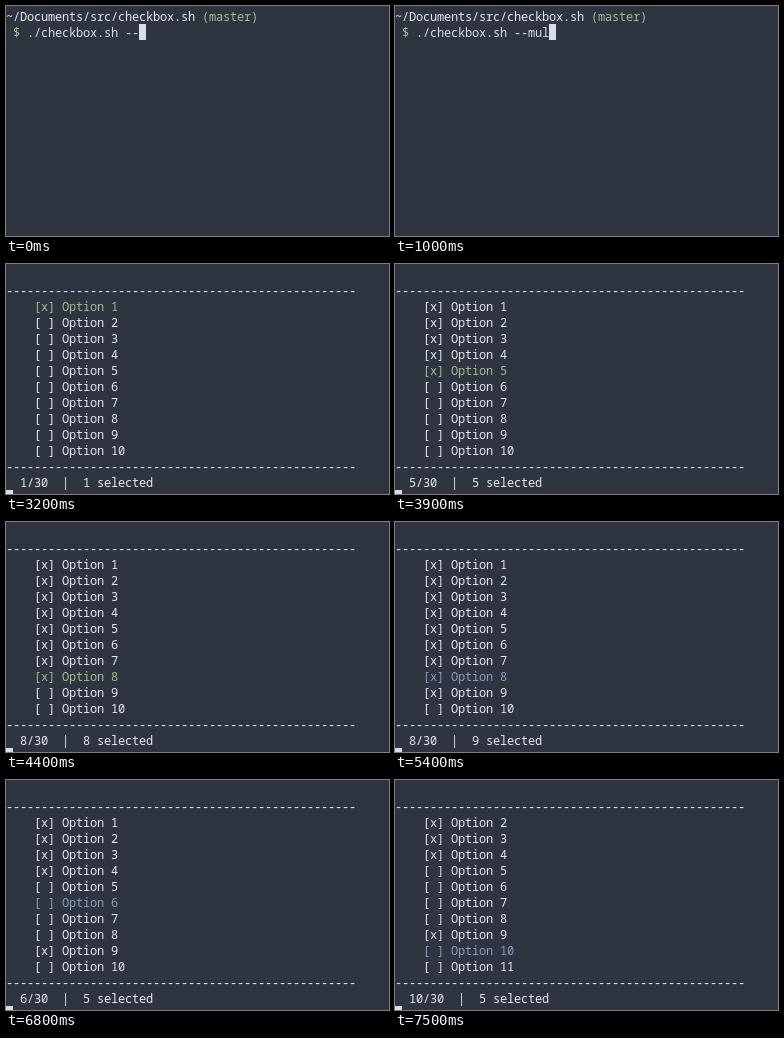
An HTML page that plays this animation: 383 px wide and 230 px high, repeating every 8000 ms.

```html
<!DOCTYPE html>
<html lang="en">
<head>
<meta charset="utf-8">
<title>checkbox.sh</title>
<style>
  html, body { margin: 0; width: 100%; height: 100%; overflow: hidden; background: #2e3440; }
  svg { display: block; }
  text { font: 12px "Noto Sans Mono", "DejaVu Sans Mono", monospace; white-space: pre; }
</style>
</head>
<body>
<svg id="screen" width="383" height="230" viewBox="0 0 383 230"></svg>
<script>
const LOOP = 8000, CELL_W = 7, CELL_H = 16, TOP = 2, ASCENT = 13;
const PAGE = 10, TOTAL = 30, MENU_AT = 2400;
const WHITE = '#e5e9f0', FG = '#d8dee9', GREEN = '#a3be8c', BLUE = '#81a1c1', RED = '#bf616a';
const MODE_COLOR = { move: BLUE, select: GREEN, unselect: RED };

const WORD = 'multiple';
const KEY_TIMES = [500, 700, 1000, 1200, 1400, 1500, 1800, 1900];

// [time, active option, mode]
const MOVES = [
  [2400, 1, 'move'],
  [3200, 1, 'select'], [3500, 2, 'select'], [3700, 3, 'select'], [3900, 5, 'select'],
  [4100, 6, 'select'], [4300, 7, 'select'], [4400, 8, 'select'], [4800, 9, 'select'],
  [5200, 9, 'move'], [5400, 8, 'move'],
  [5900, 8, 'unselect'], [6100, 7, 'unselect'], [6200, 6, 'unselect'], [6400, 5, 'unselect'],
  [6600, 5, 'move'], [6800, 6, 'move'], [7000, 7, 'move'], [7200, 8, 'move'],
  [7400, 9, 'move'], [7500, 10, 'move']
];

const screen = document.getElementById('screen');

function add(tag, attrs, content = '') {
  const node = document.createElementNS('http://www.w3.org/2000/svg', tag);
  for (const name in attrs) node.setAttribute(name, attrs[name]);
  node.textContent = content;
  screen.appendChild(node);
}

// Every glyph sits on the terminal's character grid.
function print(col, row, content, fill) {
  const x = [...content].map((_, i) => (col + i) * CELL_W).join(' ');
  add('text', { x, y: TOP + row * CELL_H + ASCENT, fill }, content);
}

function cursor(col, row) {
  add('rect', { x: col * CELL_W, y: TOP + row * CELL_H, width: CELL_W, height: CELL_H, fill: FG });
}

function drawPrompt(typed) {
  const command = './checkbox.sh --' + WORD.slice(0, typed);
  print(0, 0, '~/Documents/src/checkbox.sh', WHITE);
  print(28, 0, '(master)', GREEN);
  print(1, 1, '$', GREEN);
  print(3, 1, command, FG);
  cursor(3 + command.length, 1);
}

function drawMenu(step) {
  const selected = new Set();
  let active = 1, mode = 'move';
  for (const [, target, nextMode] of MOVES.slice(0, step)) {
    const from = Math.min(active, target), to = Math.max(active, target);
    for (let n = from; n <= to; n++) {
      if (nextMode === 'select') selected.add(n);
      if (nextMode === 'unselect') selected.delete(n);
    }
    active = target;
    mode = nextMode;
  }

  const first = Math.max(1, active - PAGE + 2);
  const rule = '-'.repeat(50);
  print(0, 1, rule, WHITE);
  for (let i = 0; i < PAGE; i++) {
    const n = first + i;
    const box = selected.has(n) ? '[x]' : '[ ]';
    print(4, 2 + i, `${box} Option ${n}`, n === active ? MODE_COLOR[mode] : WHITE);
  }
  print(0, PAGE + 2, rule, WHITE);
  print(2, PAGE + 3, `${active}/${TOTAL}  |  ${selected.size} selected`, WHITE);
  cursor(0, PAGE + 4);
}

let shown = '';
function frame() {
  const t = performance.now() % LOOP;
  const typed = KEY_TIMES.filter(time => time <= t).length;
  const step = MOVES.filter(([time]) => time <= t).length;
  const state = `${typed}:${step}`;
  if (state !== shown) {
    shown = state;
    screen.replaceChildren();
    if (t < MENU_AT) drawPrompt(typed);
    else drawMenu(step);
  }
  requestAnimationFrame(frame);
}
frame();
</script>
</body>
</html>
```
